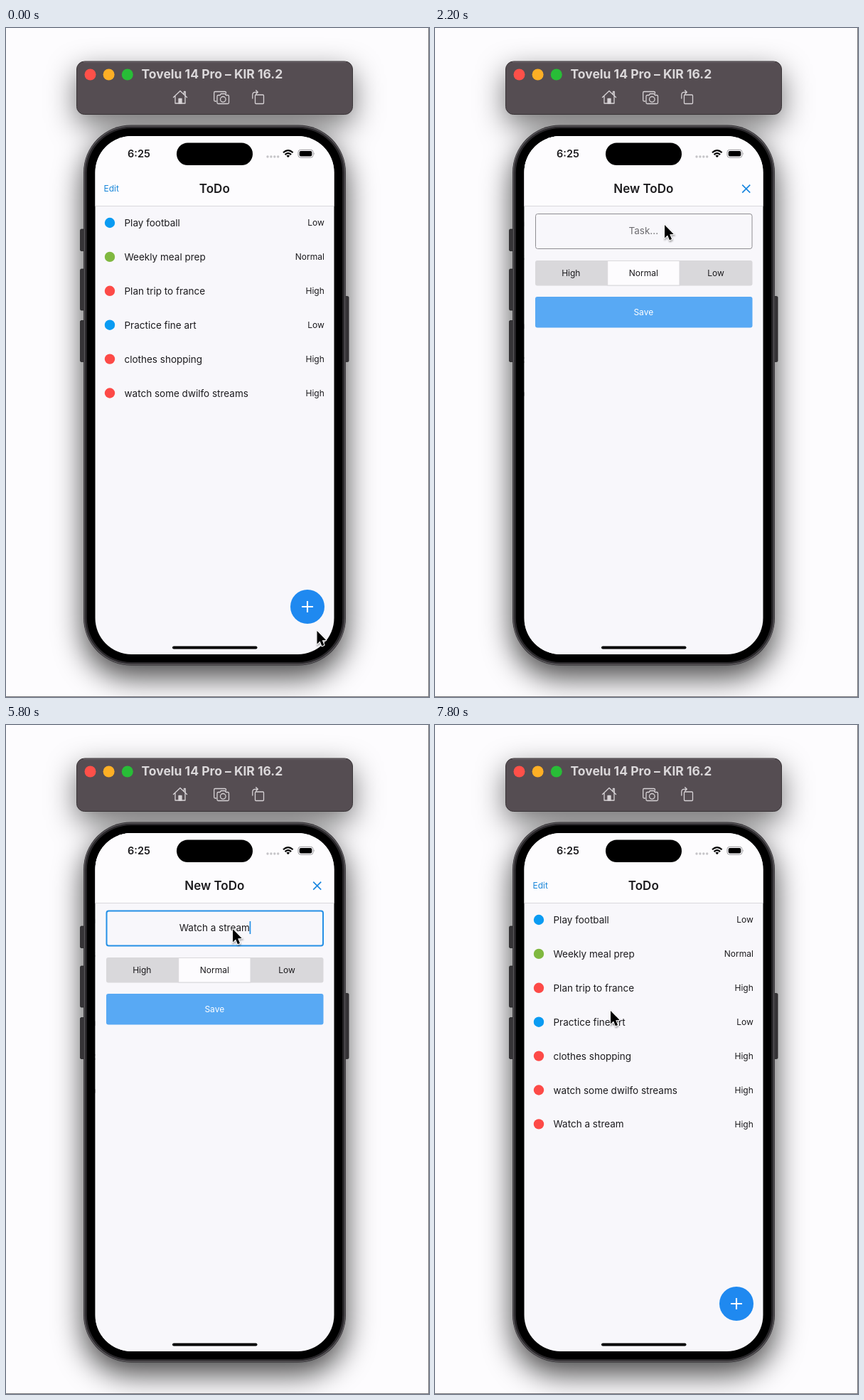
Animation of 595x941 px, one loop 8 s. Source, as an HTML page:

```html
<!DOCTYPE html>
<html lang="en">
<head>
<meta charset="utf-8">
<title>ToDo app</title>
<style>
  html, body { margin: 0; width: 100%; height: 100%; overflow: hidden; background: #fdfcfe; }
  svg { display: block; width: 595px; height: 941px; font-family: Inter, Roboto, sans-serif; fill: #1c1b1e; }
  .title { font-size: 17px; font-weight: 600; text-anchor: middle; }
  .task { font-size: 13.5px; }
  .small { font-size: 12px; }
  .mid { text-anchor: middle; }
  .end { text-anchor: end; }
  .icon { fill: none; stroke: #d6d2d5; stroke-width: 1.3; stroke-linejoin: round; stroke-linecap: round; }
</style>
</head>
<body>
<svg viewBox="0 0 595 941">
  <defs>
    <filter id="blur" x="-60%" y="-100%" width="220%" height="300%"><feGaussianBlur stdDeviation="21"/></filter>
    <filter id="soft" x="-50%" y="-50%" width="200%" height="200%"><feGaussianBlur stdDeviation="1.3"/></filter>
    <clipPath id="screen"><rect x="125.5" y="152" width="336" height="729" rx="51"/></clipPath>
    <clipPath id="saveClip"><rect x="141" y="378" width="305.5" height="43.5" rx="3"/></clipPath>
    <linearGradient id="edge"><stop offset="0" stop-opacity="0"/><stop offset="1" stop-opacity=".045"/></linearGradient>
  </defs>

  <rect width="595" height="941" fill="#fdfcfe"/>
  <g filter="url(#blur)" fill="#000">
    <rect x="99" y="61" width="389" height="75" rx="11" opacity=".55"/>
    <rect x="109" y="154" width="369" height="759" rx="66" opacity=".72"/>
  </g>
  <path d="M594.5 0V941M0 940.5H595" stroke="#77757a"/>

  <!-- simulator toolbar -->
  <rect x="99.5" y="47" width="388" height="74.5" rx="11" fill="#554d52" stroke="#393437"/>
  <path d="M109 48H478" stroke="#7c757a" opacity=".7"/>
  <circle cx="118.5" cy="65.5" r="8" fill="#fe5049"/>
  <circle cx="144.6" cy="65.5" r="8" fill="#fdaf25"/>
  <circle cx="170.8" cy="65.5" r="8" fill="#28bd37"/>
  <text x="190.5" y="71.3" font-size="17.5" font-weight="700" fill="#dbd8da">Tovelu 14 Pro – KlR 16.2</text>
  <g class="icon">
    <path d="M235.5 97.5L245 88.5L254.5 97.5M238 96V106H252V96M250.5 93V89.5H252.3V95"/>
    <path d="M243 106V99.5H247V106Z" fill="#d6d2d5"/>
    <path d="M295.5 103H294Q292.7 103 292.7 101.5V91Q292.7 89.5 294 89.5H308Q309.5 89.5 309.5 91V92"/>
    <path d="M298.5 94.5H301L302.5 92.5H308L309.5 94.5H312Q313.5 94.5 313.5 96V105Q313.5 106.5 312 106.5H298.5Q297 106.5 297 105V96Q297 94.5 298.5 94.5Z"/>
    <circle cx="305.3" cy="100.3" r="3.8"/>
    <rect x="350.5" y="94" width="12" height="12.5" rx="1.2"/>
    <path d="M346.8 99V94Q346.8 90.3 350.5 90.3H354M351.7 87.8L354.3 90.3L351.7 92.8"/>
  </g>

  <!-- phone body -->
  <g fill="#363437" stroke="#1b1a1c" stroke-width=".7">
    <rect x="104.5" y="283" width="7" height="30.5" rx="1.5"/>
    <rect x="104.5" y="339" width="7" height="58" rx="1.5"/>
    <rect x="104.5" y="411.5" width="7" height="58" rx="1.5"/>
    <rect x="475" y="377.5" width="7" height="92" rx="1.5"/>
  </g>
  <rect x="109" y="136.5" width="369" height="760" rx="67" fill="#29272a"/>
  <rect x="110.4" y="137.9" width="366.2" height="757.2" rx="65.6" fill="none" stroke="#59565a" stroke-width="1.5"/>
  <rect x="113.8" y="141" width="359.4" height="751" rx="62.5" fill="#000"/>

  <g clip-path="url(#screen)">
    <g id="listPage">
      <rect x="125" y="150" width="337" height="732" fill="#f8f7fb"/>
      <rect x="125" y="150" width="337" height="100" fill="#fdfcfe"/>
      <path d="M125 250.5H462" stroke="#dad9dc"/>
      <text x="137.5" y="230.3" class="small" fill="#1b87d9">Edit</text>
      <text x="293.3" y="232.3" class="title">ToDo</text>
      <g id="rows"></g>
      <circle cx="424" cy="814" r="24" fill="#1f89f0"/>
      <path d="M416 814H432M424 806V822" stroke="#fff" stroke-width="2.1"/>
    </g>
    <g id="formPage">
      <rect x="108.7" y="150" width="16.8" height="732" fill="url(#edge)"/>
      <rect x="125.5" y="150" width="337" height="732" fill="#f8f7fb"/>
      <rect x="125.5" y="150" width="337" height="100" fill="#fdfcfe"/>
      <path d="M125.5 250.5H462" stroke="#dad9dc"/>
      <text x="293.3" y="232.3" class="title">New ToDo</text>
      <path d="M432.2 220.7L443.2 231.7M443.2 220.7L432.2 231.7" stroke="#1b87e0" stroke-width="1.7"/>
      <rect id="field" x="141.5" y="261.5" width="304.5" height="49" rx="3" fill="none"/>
      <text id="input" x="293.3" y="290" class="task mid"></text>
      <rect id="caret" y="276" width="1.7" height="18" fill="#2590e6"/>
      <rect x="141" y="327" width="305.5" height="35.5" rx="3" fill="#d9d8db"/>
      <rect id="choice" y="327.5" width="101.3" height="34.5" fill="#fdfcfe" stroke="#d9d8db"/>
      <g class="small mid">
        <text x="191.3" y="348.8">High</text>
        <text x="293.3" y="348.8">Normal</text>
        <text x="395" y="348.8">Low</text>
      </g>
      <g clip-path="url(#saveClip)">
        <rect x="141" y="378" width="306" height="44" fill="#58a9f4"/>
        <circle id="ripple" cx="248" cy="403" fill="#3d92e6" opacity=".42"/>
      </g>
      <text x="293.3" y="404.2" class="small mid" fill="#fff">Save</text>
    </g>

    <!-- status bar and home indicator -->
    <text x="171" y="182.2" font-size="14.5" font-weight="600">6:25</text>
    <rect x="240" y="161.5" width="107" height="31.5" rx="15.7" fill="#000"/>
    <path d="M368 181H384" stroke="#c5c4c8" stroke-width="3.4" stroke-linecap="round" stroke-dasharray="0 4.9"/>
    <g fill="none" stroke="#000" stroke-width="2.1">
      <path d="M390 175.2Q396.8 168.9 403.6 175.2M392.5 178.1Q396.8 174.2 401.1 178.1"/>
      <path d="M394.4 179.6Q396.8 177.7 399.2 179.6L396.8 182.2Z" fill="#000" stroke="none"/>
    </g>
    <rect x="411" y="171.3" width="21" height="11" rx="3.4" fill="none" stroke="#99989c"/>
    <rect x="412.7" y="173" width="17.6" height="7.6" rx="2" fill="#000"/>
    <path d="M433.4 175V178.6Q434.8 176.8 433.4 175Z" fill="#99989c"/>
    <rect x="234" y="869.5" width="119.5" height="4" rx="2" fill="#000"/>
  </g>

  <g id="pointer">
    <path d="M0 0V18.4L4.1 14.5L6.9 21.3L10 20L7.2 13.3L12.7 12.9Z" transform="translate(.6 1.8)" fill="#000" stroke="#000" stroke-width="2" opacity=".35" filter="url(#soft)"/>
    <path d="M0 0V18.4L4.1 14.5L6.9 21.3L10 20L7.2 13.3L12.7 12.9Z" fill="#000" stroke="#fff" stroke-width="2.2" paint-order="stroke" stroke-linejoin="round"/>
  </g>
</svg>
<script>
  const $ = id => document.getElementById(id);
  const LOOP = 8000, STEP = 200, PAGE_WIDTH = 336, PHRASE = 'Watch a stream';
  const COLORS = { Low: '#0a9bf2', Normal: '#80b840', High: '#fd4a47' };
  const TASKS = [
    ['Play football', 'Low'], ['Weekly meal prep', 'Normal'], ['Plan trip to france', 'High'],
    ['Practice fine art', 'Low'], ['clothes shopping', 'High'],
    ['watch some dwilfo streams', 'High'], [PHRASE, 'High']
  ];
  // time, x, y of the pointer tip
  const POINTER = [
    [0, 437.5, 848], [200, 437, 846], [600, 432.5, 818], [1400, 432, 816], [1600, 416, 690],
    [1800, 372, 470], [2000, 336, 325], [2200, 323, 277], [3400, 322, 277],
    [5400, 322, 277], [5800, 319, 287], [6000, 285, 312], [6200, 238, 338],
    [6400, 219, 345], [6600, 219, 345], [6800, 230, 366], [7000, 247, 402], [LOOP, 247, 402]
  ];

  $('rows').innerHTML = TASKS.map(([name, level], i) => {
    const y = 274 + i * 47.9;
    return `<g><circle cx="146" cy="${y}" r="7.2" fill="${COLORS[level]}"/>
      <text x="166.5" y="${y + 5}" class="task">${name}</text>
      <text x="447.8" y="${y + 4.3}" class="small end">${level}</text></g>`;
  }).join('');
  const newRow = $('rows').lastElementChild;

  const show = (el, on) => el.setAttribute('visibility', on ? 'inherit' : 'hidden');
  const shift = (el, x, y = 0) => el.setAttribute('transform', `translate(${x} ${y})`);
  const clamp = v => Math.max(0, Math.min(1, v));
  const bezier = (a, b, s) => 3 * a * s * (1 - s) ** 2 + 3 * b * s * s * (1 - s) + s ** 3;

  // Fast start, long settle: cubic-bezier(.35, .91, .33, .97)
  function easeOut(x) {
    if (x <= 0 || x >= 1) return clamp(x);
    let lo = 0, hi = 1;
    for (let i = 0; i < 24; i++) {
      const s = (lo + hi) / 2;
      if (bezier(.35, .33, s) < x) lo = s; else hi = s;
    }
    return bezier(.91, .97, lo);
  }

  function pointerAt(t) {
    const i = POINTER.findIndex(k => k[0] > t);
    const [t0, x0, y0] = POINTER[i - 1], [t1, x1, y1] = POINTER[i];
    const p = (t - t0) / (t1 - t0);
    return [x0 + (x1 - x0) * p, y0 + (y1 - y0) * p];
  }

  function typedCount(t) {
    if (t < 3200) return 0;
    return Math.min(PHRASE.length, Math.max(1, Math.floor(3.001 + (t - 3600) * .0055)));
  }

  function render(t) {
    const open = easeOut((t - 978) / 400) - easeOut((t - 7300) / 400);
    shift($('listPage'), -PAGE_WIDTH * open / 3);
    shift($('formPage'), PAGE_WIDTH * (1 - open));
    show($('formPage'), open > 0);
    show(newRow, t >= 7200);

    const focused = t >= 2400, count = typedCount(t), input = $('input');
    $('field').setAttribute('stroke', focused ? '#2590e6' : '#8f8e92');
    $('field').setAttribute('stroke-width', focused ? 2 : 1);
    input.textContent = count ? PHRASE.slice(0, count) : 'Task...';
    input.setAttribute('fill', count ? '#1c1b1e' : '#6d6c70');

    const blinkFrom = t < 3200 ? 2400 : 5600;
    const caretOn = (t >= 3200 && t < 5600) || (t - blinkFrom) % 1000 < 500;
    const half = count ? input.getComputedTextLength() / 2 : 0;
    $('caret').setAttribute('x', 293 + half);
    show($('caret'), focused && caretOn);

    $('choice').setAttribute('x', t >= 6600 ? 141.5 : 242.7);
    $('ripple').setAttribute('r', t >= 7200 ? 51.5 + (t - 7200) * .5 : 0);
    shift($('pointer'), ...pointerAt(t));
  }

  const start = performance.now();
  function tick() {
    const t = (performance.now() - start) % LOOP;
    render(Math.floor(t / STEP) * STEP);
    requestAnimationFrame(tick);
  }
  tick();
</script>
</body>
</html>
```
